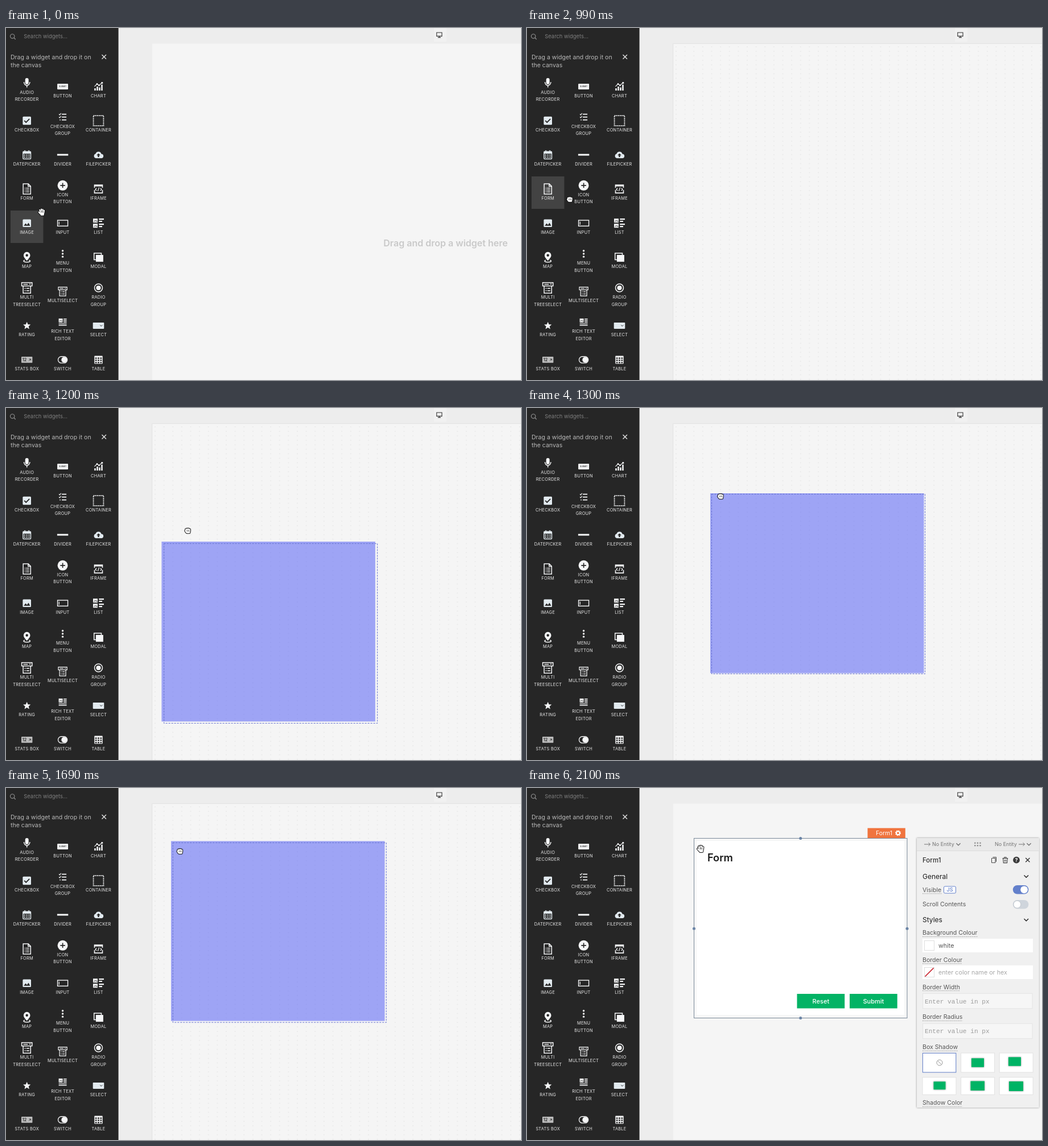
Animation, 905 px wide and 619 px high, one loop 3.85 s. Source, as an HTML page:

```html
<!DOCTYPE html>
<html lang="en">
<head>
<meta charset="utf-8">
<title>Widget drag and drop</title>
<style>
html, body { margin: 0; width: 100%; height: 100%; overflow: hidden; }
svg { display: block; width: 905px; height: 619px; font-family: Inter, sans-serif; }
.mono { font-family: "Liberation Mono", monospace; }
</style>
</head>
<body>
<svg id="stage" viewBox="0 0 905 619"></svg>
<script>
const LOOP = 3850, DARK = '#262626', PALE = '#f5f6f7', COOL = '#e2eaef', GREEN = '#03b365', BLUE = '#6380cb';
const stage = document.getElementById('stage');

// Drawing helpers
const rect = (x, y, w, h, fill, extra = '') =>
  `<rect x="${x}" y="${y}" width="${w}" height="${h}" fill="${fill}" ${extra}/>`;
const stroke = (d, color = PALE, width = 1.5, extra = '') =>
  `<path d="${d}" fill="none" stroke="${color}" stroke-width="${width}" ${extra}/>`;
const solid = (d, color = PALE) => `<path d="${d}" fill="${color}"/>`;
const dot = (x, y, r, fill = PALE, extra = '') => `<circle cx="${x}" cy="${y}" r="${r}" fill="${fill}" ${extra}/>`;
const text = (x, y, size, fill, str, extra = '') =>
  `<text x="${x}" y="${y}" font-size="${size}" fill="${fill}" ${extra}>${str}</text>`;
const group = (x, y, body, scale = 1) => `<g transform="translate(${x} ${y}) scale(${scale})">${body}</g>`;
const middle = 'text-anchor="middle"';

const tree = rect(-8.6, -8.8, 17.2, 5.6, 'none', `stroke="${PALE}" stroke-width="1.4"`) +
  stroke('M-5.8-6H1.5', PALE, 1.3) + solid('M3.4-7H6.8L5.1-5Z') + stroke('M-6.2-3V8.8H6.2V-3', PALE, 1.4) +
  stroke('M-3.8 .6H-2.2M-.8 .6H4M-3.8 4.8H-2.2M-.8 4.8H4', PALE, 1.4);

// Widget list in reading order: [label lines, icon]
const widgets = [
  ['AUDIO|RECORDER', rect(-3, -8.5, 6, 11, PALE, 'rx="3"') + stroke('M-5.2-1.5a5.2 5.8 0 0 0 10.4 0M0 4V8')],
  ['BUTTON', rect(-9.5, -5, 19, 10, PALE, 'rx="1"') + text(0, 1.2, 3.4, '#555', 'SUBMIT', middle + ' font-weight="700"')],
  ['CHART', stroke('M-6 7V3M-2 7V0M2 7V1.5M6 7V-3.5', PALE, 2.5) + stroke('M-7 0L-2.5-4.5L1-2L6.5-7', PALE, 1.2) +
    dot(-2.5, -4.5, 1.3) + dot(1, -2, 1.3) + dot(6.3, -6.5, 1.6)],
  ['CHECKBOX', rect(-7.3, -7.3, 14.6, 14.6, COOL, 'rx="1.5"') + stroke('M-4.5 0L-1.5 3L4.5-3.2', DARK, 1.8)],
  ['CHECKBOX|GROUP', stroke('M-1.5-5H6.5M-1.5 0H6.5M-1.5 5H6.5', PALE, 1.6) +
    stroke('M-6.5-5.2l1.3 1.3L-2.8-6.7M-6.5-.2l1.3 1.3L-2.8-1.7M-5.5 5h2', PALE, 1.2)],
  ['CONTAINER', rect(-8.9, -8.9, 17.8, 17.8, 'none', `stroke="${PALE}" stroke-width="1.7" stroke-dasharray="2 1.1"`)],
  ['DATEPICKER', rect(-6.8, -5.8, 13.6, 13, 'none', `stroke="${COOL}" stroke-width="1.4" rx="1"`) +
    stroke('M-7-3.5H7', COOL, 3) + stroke('M-3.5-8V-4M3.5-8V-4', COOL, 1.5) +
    stroke('M-5 .5H5.2M-5 4H5.2', COOL, 2.1, 'stroke-dasharray="2 1.9"')],
  ['DIVIDER', rect(-9.7, -1.6, 19.4, 3, PALE)],
  ['FILEPICKER', solid('M-4.5 6A4 4 0 0 1-5-1.8A5.2 5.2 0 0 1 5-1.6A3.8 3.8 0 0 1 4.8 6Z', COOL) + solid('M0-2.6L3.4 1H1.2V4H-1.2V1H-3.4Z', DARK)],
  ['FORM', stroke('M-6.5-9H2.5L6.6-4.8V9H-6.5ZM2.2-9V-4.5H6.6') +
    stroke('M-4-1.5H-2.5M-1.5-1.5H4M-4 1.8H-2.5M-1.5 1.8H4M-4 5H-2.5M-1.5 5H4', PALE, 1.4)],
  ['ICON|BUTTON', dot(0, 0, 9) + stroke('M-4.3 0H4.3M0-4.3V4.3', DARK, 1.7)],
  ['IFRAME', stroke('M-7-2V-7H7V-2M-7 2V7H7V2', PALE, 1.6) + stroke('M-7-5.3H7', PALE, 1.6) +
    stroke('M-3.2-1.8L-5.6 .6L-3.2 3M3.2-1.8L5.6 .6L3.2 3M1.1-2.6L-1.1 3.8', PALE, 1.2)],
  ['IMAGE', rect(-7.3, -6.8, 14.6, 13.6, COOL, 'rx="1.5"') + solid('M-5.5 4.5L-2.2 .3L.2 3L2.8-.8L5.8 4.5Z', DARK)],
  ['INPUT', rect(-9, -5.1, 18, 10.2, 'none', `stroke="${PALE}" stroke-width="1.4"`) + stroke('M-6.3-2.8V2.8', PALE, 1.2)],
  ['LIST', rect(-9.5, -8, 8, 7, PALE) + rect(-9.5, 1, 8, 7, PALE) + stroke('M-8-2.4l2-2.4 1.5 1.4 1-1 1.2 2M-8 6.6l2-2.4 1.5 1.4 1-1 1.2 2', DARK, 1) +
    stroke('M.8-7H9.5M.8-3.2H6.5M.8 2H9.5M.8 6H6.5', PALE, 2.2)],
  ['MAP', solid('M0 6C-3.5 2-5.8-.5-5.8-3.6A5.8 5.8 0 0 1 5.8-3.6C5.8-.5 3.5 2 0 6Z') + dot(0, -3.5, 2.2, DARK) +
    stroke('M-3.6 5C-8.5 6.6-4.5 8.5 0 8.5S8.5 6.6 3.6 5', PALE, 1.4)],
  ['MENU|BUTTON', dot(0, -5.2, 1.7) + dot(0, 0, 1.7) + dot(0, 5.2, 1.7)],
  ['MODAL', stroke('M5-4V-7.2H-7.8V4.2H-4') + rect(-4.6, -4.2, 13, 12, PALE)],
  ['MULTI|TREESELECT', group(0, 0, tree, 1.06)],
  ['MULTISELECT', group(0, 0, tree, .88)],
  ['RADIO|GROUP', dot(0, 0, 7, 'none', `stroke="${PALE}" stroke-width="1.5"`) + dot(0, 0, 4.1)],
  ['RATING', solid('M0-6.6L1.9-2.1L6.6-1.8L3 1.3L4.2 6L0 3.4L-4.2 6L-3 1.3L-6.6-1.8L-1.9-2.1Z')],
  ['RICH TEXT|EDITOR', rect(-7, -6.2, 7, 7, PALE) + stroke('M-6-.7l1.8-2.2 1.4 1.3.8-.9 1.2 1.8', DARK, .9) +
    stroke('M1.5-5.3H7M1.5-2.6H7M1.5 .1H7M-7 3H7M-7 5.7H7', PALE, 1.4)],
  ['SELECT', rect(-9.8, -5.5, 19.6, 11, COOL, 'rx=".8"') + stroke('M2.8-1L4.8 1L6.8-1', DARK, 1)],
  ['STATS BOX', rect(-9.7, -5.4, 19.4, 10.8, '#bcbcbc', 'rx=".8"') + text(-8, 2.6, 7.2, DARK, '12', 'font-weight="600"') +
    stroke('M3.5 2L6.5-1.2M4-1.4H6.7V1.2', DARK, .9)],
  ['SWITCH', rect(-8.1, -5.7, 16.2, 11.4, 'none', `stroke="${PALE}" stroke-width="1.3" rx="5.7"`) + dot(2.6, 0, 4.9)],
  ['TABLE', rect(-7.2, -7, 14.4, 14, PALE, 'rx="1"') + stroke('M-5.8-2.9H5.8M-5.8 1H5.8M-5.8 5H5.8', DARK, 2.3, 'stroke-dasharray="2.9 1.45"')],
];

const cell = ([label, icon], i) => {
  const x = 36.7 + i % 3 * 62.9, y = 109.4 + Math.floor(i / 3) * 60.07;
  const lines = label.split('|'), two = lines.length > 1;
  return group(x, y + (two ? -12.8 : -6.5), icon) + lines.map((line, k) =>
    text(x, y + (two ? 6.2 + k * 12.6 : 12.4), 7.45, '#e8e8e8', line, middle + ' letter-spacing=".24"')).join('');
};

const sidebar = rect(0, 0, 197.6, 619, DARK) + '<rect id="hover" x="8" width="57.5" height="57" fill="#434343"/>' +
  dot(11.2, 14.4, 3.7, 'none', 'stroke="#969696" stroke-width="1.1"') + stroke('M14 17.2L16.7 20', '#969696', 1.2) +
  text(31.3, 18.3, 9.4, '#7f7f7f', 'Search widgets...') +
  text(8, 55.3, 10.55, '#b9b9b9', 'Drag a widget and drop it on') + text(8, 69.3, 10.55, '#b9b9b9', 'the canvas') +
  stroke('M168.5 47L176 54.5M176 47L168.5 54.5', '#e4e4e4', 1.4) + widgets.map(cell).join('');

const canvas = rect(197, 0, 708, 619, '#ededed') + rect(752, 0, 22, 24, '#f1f1f1') +
  stroke('M756.8 8H766V14.4H756.8ZM761.4 14.4V16.4M758.8 16.6H764', '#333', 1.1) + rect(257, 27.5, 648, 592, '#f5f5f5');

const grid = `<pattern id="dots" x="254.2" y="29" width="15.625" height="7.9" patternUnits="userSpaceOnUse">${dot(7.8, 4, .62, '#cfcfcf')}</pattern>
  <g id="grid">${stroke('M256.7 619V27.4H905', '#e2e2e2', 1)}${rect(261, 32, 643, 587, 'url(#dots)')}</g>`;

const ghost = `<g id="ghost">${rect(0, 0, 375.5, 316.3, 'rgb(103,113,245)', 'fill-opacity=".61"')}</g>
  <g id="slot">${rect(0, 0, 375, 316, 'none', 'stroke="#6470d0" stroke-dasharray="3 2"')}</g>`;

const button = (x, label) => rect(x, 362, 83.7, 25.5, GREEN) +
  text(x + 41.9, 378.8, 11, '#fff', label, middle + ' font-weight="500"');
const form = '<g id="form">' + rect(293.5, 88.5, 374.5, 316, '#f6f6f6', 'stroke="#7a8999"') +
  rect(298, 93, 365, 306, '#fff') + text(317, 129, 18.2, '#1c1c1c', 'Form', 'font-weight="600"') +
  button(474.5, 'Reset') + button(567, 'Submit') +
  [[480.7, 88.5], [480.7, 404.5], [293.5, 247.2], [668, 247.2]].map(([x, y]) => dot(x, y, 2.5, '#6a84a6')).join('') + '</g>';

// Property pane
const label = (y, str) => text(695, y, 10.6, '#575757', str, 'class="underlined"');
const chevron = (x, y, s, color) => stroke(`M${x - s} ${y - s / 2}l${s} ${s} ${s}-${s}`, color, 1.4);
const section = (y, str) => text(695, y, 12, '#1d1d1d', str) + chevron(877.3, y - 4.4, 3.8, '#222');
const toggle = (y, on) => rect(853.8, y - 7.7, 27.6, 15.4, on ? BLUE : '#cfd5dc', 'rx="7.7"') +
  dot(on ? 873.6 : 861.4, y, 6.4, '#fff', on ? '' : 'stroke="#b9bfc6" stroke-width=".8"');
const entity = (x, tail) => text(x, 102.2, 9, '#757575', 'No Entity') +
  stroke(`M${tail ? x + 42 : x - 14} 99h10.5m-3-2.8l3 2.8-3 2.8`, '#757575', 1) + chevron(x + (tail ? 60 : 46), 99, 3.6, '#757575');
const colorInput = (y, color, str, mark = '') => rect(695, y, 194, 24, '#fff') +
  rect(698.5, y + 3.5, 17, 17, '#fff', 'stroke="#dedede"') + mark + text(723, y + 16, 10.75, color, str);
const sizeInput = y => rect(695.5, y, 192.5, 26.5, '#f6f6f6', 'stroke="#e4e4e4"') +
  text(699, y + 17.2, 11.15, '#9c9c9c', 'Enter value in px', 'class="mono"');
const shadowTile = (col, row, x, y, w, h) => rect(695 + col * 67.6, row ? 508.8 : 466, 59, row ? 30.5 : 34, '#fff', 'stroke="#e2e2e2"') +
  (w ? rect(x, y, w, h, GREEN, 'filter="url(#soft)"') : '');

const pane = `<filter id="soft" x="-30%" y="-30%" width="160%" height="160%"><feDropShadow dx="0" dy="0" stdDeviation="1.6" flood-opacity=".45"/></filter>
  <g id="pane">` + rect(598.5, 70.5, 66.3, 17.5, '#f0743e') + text(613, 83, 10.4, '#fff', 'Form1') +
  dot(652, 79.2, 2.9, 'none', 'stroke="#fff" stroke-width="2"') + dot(652, 79.2, 4.3, 'none', 'stroke="#fff" stroke-width="1.6" stroke-dasharray="1.7 1.68"') +
  rect(685, 88, 214.5, 474, '#f0f0f0', 'filter="url(#soft)"') + rect(685, 88, 214.5, 22.5, '#e9e9e9') + stroke('M685 110.5H899.5', '#dcdcdc', 1) +
  entity(712) + entity(822, true) +
  [0, 1, 2, 3, 4, 5].map(i => dot(787.3 + i % 3 * 4.6, 96.7 + Math.floor(i / 3) * 4.6, 1.3, '#8b8b8b')).join('') +
  text(695, 131.2, 11.5, '#333', 'Form1', 'font-weight="500"') +
  stroke('M817.5 123.5h5.5v7.8h-6.5v-7.8ZM818.5 121.7h6v8', '#444', 1) +
  stroke('M835.6 123.6h9.6M838.8 123.4v-1.6h3.2v1.6M836.6 124l.7 7.6h6.3l.7-7.6M839.3 126v3.5M841.6 126v3.5', '#444', 1.1) +
  dot(860, 126.7, 5.9, '#3a3a3a') + text(860, 130, 9, '#fff', '?', middle + ' font-weight="700"') +
  stroke('M876.2 123l7.2 7.2M883.4 123l-7.2 7.2', '#333', 1.4) +
  section(159.7, 'General') + label(182.8, 'Visible') +
  rect(732.5, 173, 21, 12, '#fff', `rx="2" stroke="${BLUE}"`) + text(743, 182.3, 9, BLUE, 'JS', middle + ' font-weight="500"') +
  toggle(178.8, true) + text(695, 208, 10.6, '#575757', 'Scroll Contents') + toggle(204.7, false) +
  section(236.2, 'Styles') + label(258.4, 'Background Colour') + colorInput(265, '#555', 'white') +
  label(305.8, 'Border Colour') + colorInput(312, '#a8a8a8', 'enter color name or hex', stroke('M699.5 331.5L714.5 316.5', '#c8202c', 1.7)) +
  label(353.5, 'Border Width') + sizeInput(361.3) + label(406.4, 'Border Radius') + sizeInput(414.2) + label(459.2, 'Box Shadow') +
  shadowTile(0, 0) + rect(695.4, 466.3, 58.4, 33.7, '#fff', `stroke="${BLUE}"`) +
  dot(725, 483, 5, 'none', 'stroke="#999"') + stroke('M721.5 479.5l7 7', '#999', 1) +
  shadowTile(1, 0, 781, 475.3, 22, 15.5) + shadowTile(2, 0, 846, 473.3, 22, 15.5) +
  shadowTile(0, 1, 714.5, 516.3, 21, 14) + shadowTile(1, 1, 779.5, 515.5, 24.5, 16.5) + shadowTile(2, 1, 847, 516, 25, 17) +
  label(557.2, 'Shadow Color') + '</g>';

const hand = (id, d, creases) => `<g id="${id}" transform="scale(1.1)" stroke-linecap="round" stroke-linejoin="round">
  ${stroke(d, '#111', 3.7)}<path d="${d}" fill="#fff" stroke="#fff" stroke-width="1.9"/>${stroke(creases, '#222', .6)}</g>`;
const pointer = '<g id="pointer">' +
  hand('open', 'M-4.5 0L-2.5 2.6M-3-3.4L-1.6 1M-.5-4.6V1M1.8-4.2L1.6 1M4-2.6L3.3 2M-2 1.6L3.2 1L2.8 4.6H-.8Z', 'M-.9-1.8V.6M.8-1.8V.6M2.6-1V.8') +
  hand('closed', 'M-2.8-2V0M-.8-2.7V0M1.3-2.6V0M3.3-1.7V1M-3.6 .4L-2 2.8M-2.8-1L3.3-.6L2.8 3.4H-1.2Z', 'M-1.2-.6V1.3M.6-.6V1.3M2.3-.6V1.3') + '</g>';

stage.innerHTML = canvas + text(772.5, 383.6, 16, '#c9c9c9', 'Drag and drop a widget here', `id="hint" ${middle} font-weight="600"`) +
  grid + ghost + form + pane + sidebar + pointer;

for (const el of stage.querySelectorAll('.underlined')) {
  const y = +el.getAttribute('y') + 3;
  el.insertAdjacentHTML('afterend', stroke(`M695 ${y}h${el.getComputedTextLength()}`, '#8c8c8c', .8, 'stroke-dasharray="2 1.5"'));
}

// Motion keys: [ms, x, y]
const pointerKeys = [[200, 61.6, 323], [440, 40, 299], [689, 40, 299], [690, 53, 300], [989, 53, 300], [990, 75, 301],
  [1200, 319.3, 215.5], [1290, 340, 155], [1440, 341, 124], [1500, 331, 118], [1540, 328, 117], [1690, 305.5, 111], [1990, 305, 107]];
const ghostKeys = [[1170, 260, 262], [1200, 273.4, 235], [1290, 322, 150], [1440, 329.3, 109.4], [1500, 321, 102],
  [1540, 315, 100], [1690, 290, 93.4], [1990, 290, 88]];

function along(keys, t) {
  const i = keys.findIndex(k => k[0] > t);
  if (i === 0) return keys[0].slice(1);
  if (i < 0) return keys.at(-1).slice(1);
  const [a, b] = [keys[i - 1], keys[i]], p = (t - a[0]) / (b[0] - a[0]);
  return [1, 2].map(k => a[k] + (b[k] - a[k]) * p);
}

function held(t) {
  const [start, gap] = t >= 1540 ? [1540, 50] : t >= 990 ? [990, 30] : [200, 30];
  return t < start ? t : start + Math.floor((t - start) / gap) * gap;
}

const $ = id => document.getElementById(id);
const show = (id, on) => $(id).setAttribute('display', on ? 'inline' : 'none');
const move = (id, [x, y]) => $(id).setAttribute('transform', `translate(${x} ${y})`);
const snap = (v, origin, step) => origin + Math.round((v - origin) / step) * step;

function draw() {
  const now = performance.now() % LOOP, t = held(now), dropped = t >= 1990;
  const at = along(pointerKeys, t), corner = along(ghostKeys, t);
  const dragging = t >= 1170 && !dropped, closed = now >= 690 && !dropped;
  move('pointer', now < 50 ? [62.6, 323.6] : along(pointerKeys, now < 990 && now >= 690 ? 690 : t));
  move('ghost', corner);
  move('slot', [snap(corner[0], 262, 15.625), snap(corner[1], 33, 7.9)]);
  $('hover').setAttribute('y', at[1] > 318 && t < 440 ? 321 : 261);
  show('hover', t < 1050);
  show('hint', t < 990);
  show('grid', t >= 990 && !dropped);
  show('ghost', dragging);
  show('slot', dragging);
  show('form', dropped);
  show('pane', now >= 2100);
  show('open', !closed);
  show('closed', closed);
  requestAnimationFrame(draw);
}
draw();
</script>
</body>
</html>
```
